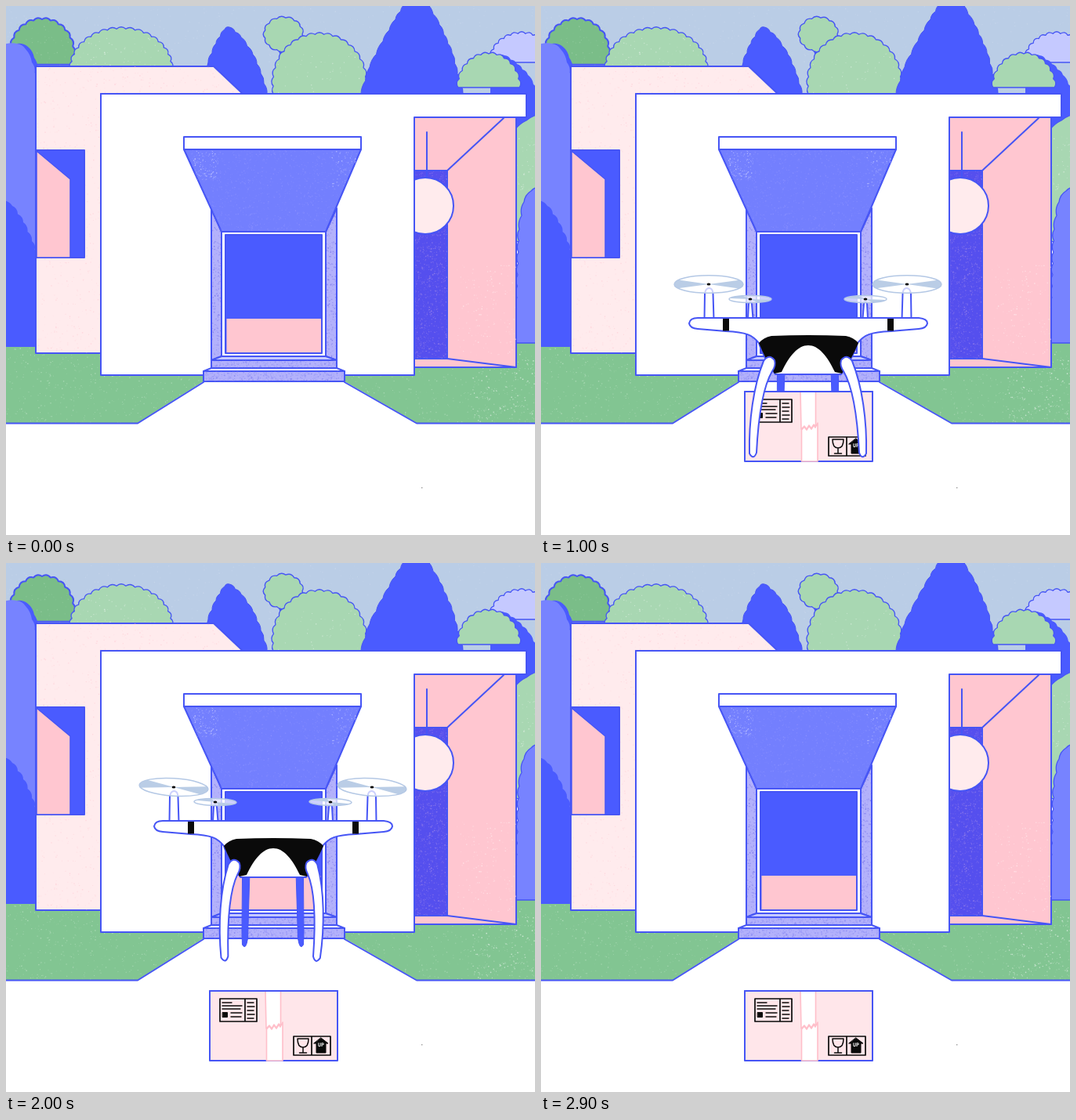
Recreate the animation shown at these times as an HTML page with a canvas. Size 675 by 675 pixels, loop 3.3 s.

```html
<!DOCTYPE html>
<html lang="en">
<head>
<meta charset="utf-8">
<title>Drone delivery</title>
<style>
html, body { margin: 0; width: 100%; height: 100%; overflow: hidden; background: #fff; }
canvas { display: block; width: 675px; height: 675px; }
</style>
</head>
<body>
<canvas id="stage" width="675" height="675"></canvas>
<script>
const SIZE = 675, LOOP = 3300, STEP = 100;
const INK = '#4655f5', BLUE = '#4a5bff', VIOLET = '#7783ff', LILAC = '#c5c9ff';
const PINK = '#ffc6d0', BLUSH = '#ffebed', SKY = '#bacde6', WHITE = '#fff';
const LEAF = '#a8d7b2', MOSS = '#7abd88', GRASS = '#82c592', LAVENDER = '#b3b1fb';
const RAD = Math.PI / 180;

const stage = document.getElementById('stage').getContext('2d');
const scenery = document.createElement('canvas');
scenery.width = scenery.height = SIZE;

let seed = 7;
function random() {
  seed = (seed * 16807) % 2147483647;
  return seed / 2147483647;
}

function paint(c, shape, fill, line = INK, width = 2) {
  const path = typeof shape === 'string' ? new Path2D(shape) : shape;
  c.lineJoin = c.lineCap = 'round';
  if (fill) { c.fillStyle = fill; c.fill(path); }
  if (line) { c.strokeStyle = line; c.lineWidth = width; c.stroke(path); }
  return path;
}

// Specks of colour inside a shape, like a dry print.
function grain(c, shape, [x, y, w, h], color, count, alpha = 0.5) {
  c.save();
  c.clip(typeof shape === 'string' ? new Path2D(shape) : shape);
  c.fillStyle = color;
  for (let i = 0; i < count; i++) {
    c.globalAlpha = alpha * (0.3 + 0.7 * random());
    const s = 0.6 + random() * 0.9;
    c.fillRect(x + random() * w, y + random() * h, s, s);
  }
  c.restore();
}

// Leafy outline: small bumps along a chain of points.
function scallop(points, size, bulge) {
  const path = new Path2D();
  path.moveTo(...points[0]);
  for (let i = 1; i < points.length; i++) {
    const [x0, y0] = points[i - 1], [x1, y1] = points[i];
    const dx = x1 - x0, dy = y1 - y0, length = Math.hypot(dx, dy);
    const n = Math.max(1, Math.round(length / size));
    for (let k = 1; k <= n; k++) {
      const mid = (k - 0.5) / n, end = k / n;
      path.quadraticCurveTo(
        x0 + dx * mid + dy / length * bulge, y0 + dy * mid - dx / length * bulge,
        x0 + dx * end, y0 + dy * end);
    }
  }
  path.closePath();
  return path;
}

function dome(cx, cy, rx, ry, n, from = 180, to = 360) {
  const points = [];
  for (let i = 0; i <= n; i++) {
    const a = (from + (to - from) * i / n) * RAD;
    points.push([cx + rx * Math.cos(a), cy + ry * Math.sin(a)]);
  }
  return scallop(points, 99, 5);
}

function drawTrees(c) {
  paint(c, dome(46, 60, 40, 43, 14, 160, 380), MOSS);
  grain(c, 'M5 10H90V76H5Z', [12, 20, 70, 56], LEAF, 60);
  paint(c, dome(147, 80, 64, 51, 17), LEAF, INK, 1.3);
  grain(c, 'M90 35H205V76H90Z', [90, 40, 110, 36], WHITE, 60);

  paint(c, scallop([[14, 48], [28, 52], [36, 66], [40, 80], [40, 110], [14, 110]], 14, 3), BLUE, null);
  paint(c, scallop([[-5, 50], [14, 48], [25, 55], [33, 72], [40, 98], [40, 436], [-5, 436]], 13, 3), VIOLET, null);
  paint(c, scallop([[-5, 248], [8, 255], [22, 276], [33, 300], [40, 322], [40, 435], [-5, 435]], 14, 4), BLUE, null);

  paint(c, scallop([[257, 112], [258, 72], [268, 48], [279, 30], [285, 27], [300, 40],
    [315, 62], [325, 86], [333, 112]], 13, 3), BLUE, INK, 1);

  paint(c, 'M349 58L355 82H360L362 56L357 66Z', WHITE, INK, 1.3);
  paint(c, dome(354, 36, 24, 21, 13, 0, 360), LEAF, INK, 1.4);
  paint(c, dome(400, 98, 59, 62, 19, 165, 375), LEAF, INK, 1.3);
  grain(c, 'M345 60H455V112H345Z', [345, 55, 105, 57], WHITE, 50);
  paint(c, scallop([[453, 113], [464, 78], [481, 45], [497, 17], [510, -3], [537, -3],
    [553, 24], [569, 60], [583, 113]], 15, 3), BLUE, INK, 1);

  paint(c, dome(658, 72, 40, 37, 13), LILAC, INK, 1.3);
  paint(c, scallop([[618, 65], [636, 63], [652, 74], [666, 88], [680, 112], [680, 160], [618, 160]], 12, 3), BLUE, null);
  paint(c, dome(616, 104, 39, 43, 12), LEAF, INK, 1.3);

  paint(c, scallop([[650, 240], [650, 157], [664, 146], [680, 138], [680, 300], [650, 300]], 14, 2), LEAF, INK, 1.3);
  paint(c, 'M650 142H666L650 156Z', BLUE, null);
  grain(c, 'M652 165H675V235H652Z', [652, 160, 23, 75], WHITE, 40);
  paint(c, scallop([[650, 430], [655, 285], [661, 250], [670, 236], [682, 232], [682, 430]], 15, 4), VIOLET, INK, 1.3);
}

function drawWings(c) {
  const wing = 'M38 77H265L302 112H121V443H38Z';
  paint(c, wing, BLUSH);
  grain(c, wing, [38, 77, 264, 366], PINK, 1500, 0.6);
  paint(c, 'M39 184H100V321H39Z', BLUE);
  paint(c, 'M39 185L82 221V321H39Z', PINK, INK, 1.5);

  const room = 'M521 142H651V461H521Z';
  paint(c, room, PINK);
  grain(c, room, [575, 330, 75, 115], BLUSH, 170, 0.8);
  const wall = 'M521 210H563V450H521Z';
  paint(c, wall, '#554fee');
  grain(c, wall, [521, 210, 42, 240], '#a28be9', 1100, 0.6);
  paint(c, 'M563 210L635 143M563 450L651 461M537 161V219', null);
  c.save();
  c.clip(new Path2D('M521 210H600V300H521Z'));
  paint(c, 'M499 255A36 36 0 1 1 571 255A36 36 0 1 1 499 255Z', BLUSH);
  c.restore();
}

function drawEntrance(c) {
  const pillars = 'M262 258L275 288V447L262 452ZM422 258L408 288V447L422 452Z';
  paint(c, pillars, LAVENDER);
  grain(c, pillars, [262, 258, 160, 194], '#716ee9', 3600, 0.65);
  const canopy = 'M227 183H453L408 288H275Z';
  paint(c, canopy, '#737ffe');
  grain(c, canopy, [227, 183, 226, 105], '#989bff', 1500, 0.5);
  grain(c, canopy, [238, 185, 32, 36], LILAC, 120, 0.8);
  grain(c, canopy, [415, 185, 36, 45], LILAC, 70, 0.8);
  paint(c, 'M227 167H453V183H227Z', WHITE);

  paint(c, 'M275 288H408V447H275Z', WHITE);
  paint(c, 'M280 292H403V443H280Z', BLUE);
  paint(c, 'M281.5 399H402V442H281.5Z', PINK, null);

  const steps = 'M262 452H422V462H262ZM252 466H432V479H252Z';
  paint(c, 'M275 447H408L422 452H262Z', LILAC);
  paint(c, 'M262 462H422L432 466H252Z', WHITE);
  paint(c, steps, LAVENDER);
  grain(c, steps, [252, 452, 180, 27], '#7b7df0', 1100, 0.55);
}

function drawScenery(c) {
  c.fillStyle = WHITE;
  c.fillRect(0, 0, SIZE, SIZE);
  c.fillStyle = SKY;
  c.fillRect(0, 0, SIZE, 160);
  grain(c, 'M0 0H675V112H0Z', [0, 0, SIZE, 112], '#d2deef', 800, 0.5);

  const lawn = 'M0 430H675V532H524L432 479H252L168 532H0Z';
  paint(c, lawn, GRASS, null);
  drawTrees(c);
  c.fillStyle = GRASS;
  c.fillRect(0, 435, 40, 20);
  grain(c, lawn, [0, 436, SIZE, 96], '#c1e5c8', 1300, 0.65);
  grain(c, lawn, [590, 440, 85, 90], WHITE, 160, 0.7);
  paint(c, 'M-2 532.5H168L252 480M432 480L524 532.5H677', null);

  drawWings(c);
  paint(c, 'M121 112H664V142H521V471H121Z', WHITE);
  drawEntrance(c);
  c.fillStyle = '#999';
  c.fillRect(530, 614, 1.4, 1.4);
}

// The parcel is drawn at its place on the ground.
function drawParcel(c, lift) {
  const black = '#0a0a0a';
  c.save();
  c.translate(0, -lift);
  paint(c, 'M260 546H423V635H260Z', '#ffe6ea');
  paint(c, 'M331 546H350.5V590L348 588L345 593L342 589L339 594L336 590L332 594Z', WHITE, '#ffbfca', 1.6);
  paint(c, 'M332.5 595L336 591L339 595L342 590L345 594L348 589L350 592L353 586V635H332.5Z', WHITE, '#ffbfca', 1.6);
  paint(c, 'M260 546H423', null);

  paint(c, 'M273 556H320V585H273ZM305 556V585', null, black, 1.7);
  paint(c, 'M276 561H288M276 565H301M276 569H299M287 574H301M287 579H300' +
    'M308 561H316M308 566H317M308 571H316M308 576H317M308 581H316', null, black, 1.4);
  paint(c, 'M276.5 573.5H282.5V579.5H276.5Z', black, black, 1);

  paint(c, 'M367 604H414V628H367ZM390 604V628', null, black, 1.7);
  paint(c, 'M372 607H386Q386 618 379 618Q372 618 372 607ZM379 618V624M374.5 625H383.5', null, black, 1.5);
  paint(c, 'M402 606L411 613H408V625H396V613H393Z', black, black, 1);
  c.fillStyle = WHITE;
  c.font = 'bold 6.5px "DejaVu Sans Mono", monospace';
  c.textAlign = 'center';
  c.fillText('UP', 402, 617);
  c.restore();
}

function drawPropeller(c, x, y, rx, ry, phase, tilt) {
  c.save();
  c.translate(x, y);
  c.rotate(tilt * RAD);
  c.scale(1, ry / rx);
  c.beginPath();
  c.arc(0, 0, rx, 0, 2 * Math.PI);
  c.fillStyle = 'rgba(255,255,255,.72)';
  c.fill();
  c.fillStyle = SKY;
  for (const side of [0, 180]) {
    c.beginPath();
    c.moveTo(0, 0);
    c.arc(0, 0, rx, (phase + side - 28) * RAD, (phase + side + 28) * RAD);
    c.fill();
  }
  c.restore();
  c.beginPath();
  c.ellipse(x, y, rx, ry, tilt * RAD, 0, 2 * Math.PI);
  c.strokeStyle = '#b4c8e5';
  c.lineWidth = 1.5;
  c.stroke();
  c.beginPath();
  c.ellipse(x, y, 2.4, 1.5, 0, 0, 2 * Math.PI);
  c.fillStyle = '#0a0a0a';
  c.fill();
}

// Draws a left-hand part and its mirror image, each turned about a joint.
function drawPair(c, shape, fill, joint, angles) {
  angles.forEach((angle, right) => {
    c.save();
    if (right) { c.translate(681, 0); c.scale(-1, 1); }
    c.translate(...joint);
    c.rotate(angle * RAD);
    c.translate(-joint[0], -joint[1]);
    paint(c, shape, fill, INK, fill === BLUE ? 1 : 2);
    c.restore();
  });
}

function between(t, from, to) {
  return Math.min(1, Math.max(0, (t - from) / (to - from)));
}
function smooth(t, from, to) {
  const u = between(t, from, to);
  return u * u * (3 - 2 * u);
}
function track(t, keys) {
  for (let i = 1; i < keys.length; i++) {
    if (t <= keys[i][0]) {
      const [t0, v0] = keys[i - 1], [t1, v1] = keys[i];
      return v0 + (v1 - v0) * between(t, t0, t1);
    }
  }
  return keys[keys.length - 1][1];
}

function pose(t) {
  let y = 0;
  if (t < 968) y = -4.8e-4 * (968 - t) ** 2;
  else if (t < 2000) y = -69 * smooth(t, 1400, 1870);
  else y = track(t, [[2000, -69], [2100, -86], [2200, -116], [2300, -154],
    [2400, -190], [2500, -206], [2800, -277]]);
  const opened = between(t, 1100, 1400), relaxed = smooth(t, 1400, 1800);
  return {
    x: 172 * Math.max(0, (t - 2000) / 500) ** 1.7,
    y,
    lean: 14.86 * smooth(t, 2000, 2350),
    tilt: 3.5 * smooth(t, 1700, 2000),
    spin: 67 + 109 * (t - 400) / STEP,
    legs: [8.2 * opened - 12.4 * relaxed, 8.2 * opened - 15.2 * relaxed],
    rear: 7.5 * opened - 7.5 * relaxed,
    parcelLift: t < 1200 ? 54 - y : track(t, [[1200, 46], [1300, 24], [1400, 0]])
  };
}

function place(c, p, draw) {
  c.save();
  c.translate(341 + p.x, 405 + p.y);
  c.rotate(p.lean * RAD);
  c.translate(-341, -405);
  draw();
  c.restore();
}

function drawRearLegs(c, p) {
  drawPair(c, 'M302 462H311L308.5 548Q306 564 301.5 556L301 540Z', BLUE, [306, 465], [p.rear, p.rear]);
}

function drawDrone(c, p) {
  const still = [0, 0];
  drawPair(c, 'M264 399L265 380Q267 375 269 380L270.5 399Z', WHITE, [0, 0], still);
  drawPair(c, 'M208.5 400L209 367Q210 360 214.5 360Q219 360 219.5 367L220.5 400Z', WHITE, [0, 0], still);
  paint(c, 'M200 398H482Q493 399 493 405Q492 411 482 412L446 415C420 416 412 420 404 430' +
    'Q400 445 383 470H299Q282 445 278 430C270 420 262 416 236 415L200 412Q190 411 189 405Q190 398 200 398Z', WHITE);
  paint(c, 'M278 430Q284 423 294 421Q341 419 389 421Q399 423 405 430Q397 449 384 469L375 467' +
    'C365 446 354 433 341 433S317 446 307 467L298 469Q286 450 278 430Z', '#0a0a0a', null);
  paint(c, 'M232 399H240V414.5H232ZM442 399H450V414.5H442Z', '#0a0a0a', null);
  drawPair(c, 'M284 453Q291 443 298 452Q300 459 295 466C282 488 277 530 275 570' +
    'Q271 580 266 571C265 530 271 485 284 453Z', WHITE, [291, 456], p.legs);

  for (const x of [267, 414]) drawPropeller(c, x, 374, 27, 4.5, p.spin + 40, p.tilt / 3);
  for (const x of [214, 467]) drawPropeller(c, x, 355, 44, 11.3, p.spin, p.tilt);
}

function render(time) {
  const t = Math.floor((time % LOOP) / STEP) * STEP;
  stage.drawImage(scenery, 0, 0);
  if (t >= 100) {
    const p = pose(t), flying = t < 2900;
    if (flying) place(stage, p, () => drawRearLegs(stage, p));
    drawParcel(stage, p.parcelLift);
    if (flying) place(stage, p, () => drawDrone(stage, p));
  }
}

drawScenery(scenery.getContext('2d'));
const start = performance.now();
function tick() {
  render(performance.now() - start);
  requestAnimationFrame(tick);
}
tick();
</script>
</body>
</html>
```
